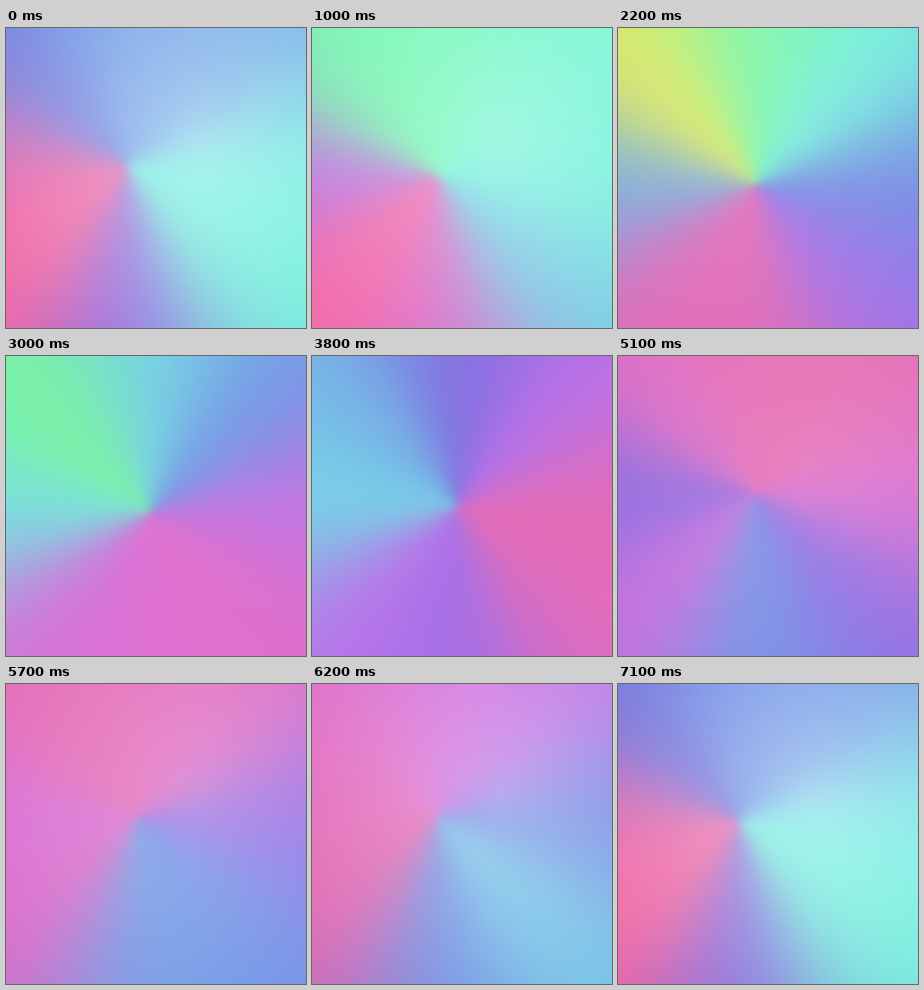
Animation of 300 by 300 pixels, one loop 7.2 s. Source, as an HTML page with a canvas:

```html
<!DOCTYPE html>
<html lang="en">
<head>
<meta charset="utf-8">
<title>Turning colour wheel</title>
<style>
html, body { margin: 0; width: 100%; height: 100%; overflow: hidden; }
canvas { display: block; width: 100vw; height: 100vh; }
</style>
</head>
<body>
<canvas id="stage" width="150" height="150"></canvas>
<script>
const LOOP = 7200, STEP = 100, SIZE = 150, SCALE = 300 / SIZE, TURN = 2 * Math.PI;

// Yellow, green, mint, aqua, sky, blue, indigo, violet, orchid, pink, rose.
const ramp = [
  [235, 235, 90], [125, 242, 130], [115, 250, 195], [115, 240, 228],
  [120, 195, 232], [112, 145, 230], [110, 105, 217], [180, 115, 240],
  [222, 112, 212], [229, 107, 176], [252, 110, 160]
];

// Each compass direction swings along the ramp: middle, reach, moment of the peak.
const swings = [
  [5.8, 3.3, .58],  // east, then counterclockwise
  [5.6, 3.4, .70],
  [5.1, 3.9, .73],
  [4.4, 4.5, .785],
  [6.2, 3.0, .95],
  [8.6, 1.4, .07],
  [6.8, 2.1, .27],
  [5.7, 3.0, .50]
];

const mix = (a, b, k) => a + (b - a) * k;
const wave = phase => Math.cos(TURN * phase);

function rampColour(tone) {
  const t = Math.min(Math.max(tone, 0), ramp.length - 1.001);
  const stop = Math.floor(t);
  return ramp[stop].map((v, n) => mix(v, ramp[stop + 1][n], t - stop));
}

const context = document.getElementById("stage").getContext("2d");
const picture = context.createImageData(SIZE, SIZE);

function paint(phase) {
  const spokes = swings.map(([middle, reach, peak], i) => ({
    x: Math.cos(TURN * i / swings.length),
    y: -Math.sin(TURN * i / swings.length),
    colour: rampColour(middle + reach * wave(phase - peak))
  }));
  const centreX = 133 - 12 * wave(phase);
  const centreY = 145 + 12 * wave(phase - .35);
  const haze = .2 * (1 + wave(phase));
  let at = 0;
  for (let j = 0; j < SIZE; j++) {
    for (let i = 0; i < SIZE; i++) {
      const x = (i + .5) * SCALE, y = (j + .5) * SCALE;
      const dx = x - centreX, dy = y - centreY;
      // Spokes mix evenly at the centre and separate further out.
      const focus = 8 / (Math.hypot(dx, dy) + 25);
      let r = 0, g = 0, b = 0, total = 0;
      for (const spoke of spokes) {
        const weight = Math.exp(focus * (dx * spoke.x + dy * spoke.y));
        r += weight * spoke.colour[0];
        g += weight * spoke.colour[1];
        b += weight * spoke.colour[2];
        total += weight;
      }
      const pale = haze * Math.max(0, 1 - Math.hypot(x - 190, y - 110) / 250);
      for (const sum of [r, g, b]) picture.data[at++] = mix(sum / total, 255, pale);
      picture.data[at++] = 255;
    }
  }
  context.putImageData(picture, 0, 0);
}

const start = performance.now();
let shown = -1;
function tick() {
  const time = Math.floor((performance.now() - start) % LOOP / STEP) * STEP;
  if (time !== shown) {
    shown = time;
    paint(time / LOOP);
  }
  requestAnimationFrame(tick);
}
tick();
</script>
</body>
</html>
```
